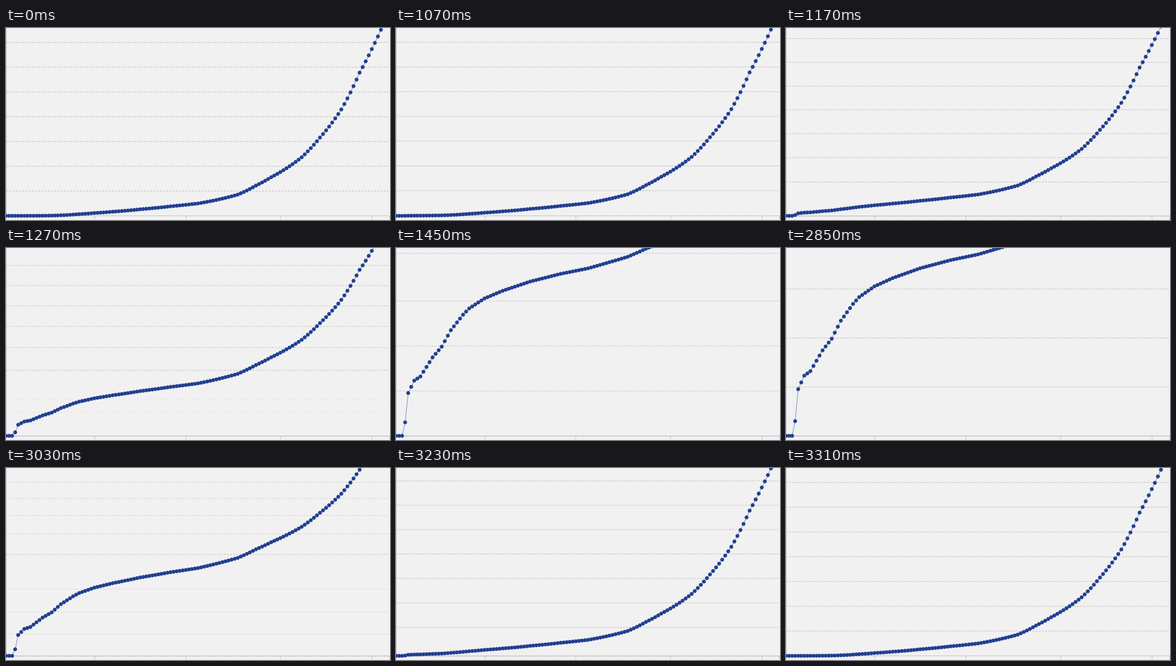
A matplotlib script that plays this animation: 600 px wide and 300 px high, repeating every 4340 ms.

```python
import numpy as np
import matplotlib.pyplot as plt
from matplotlib.animation import FuncAnimation
from matplotlib.collections import LineCollection

W, H, DPI = 600, 300, 100
PX = 72 / DPI                 # one pixel in points
LOOP, STEP = 4340, 10         # ms
BASE = 293.5                  # y of the zero line
UNIT, DECADE = 38.71, 80      # pixels per 10,000 and per power of ten
DAY = 4.763                   # pixels per day
START, BACK = 1070, 19        # first redraw in ms, redraw that turns back
RATE = .151                   # tween progress per redraw

BLUE, GRID, AXIS = "#213f91", "#bfbfbf", "#c6c6c6"

# Day and total; growth is exponential between these points
KEYS = [(2, 1), (3, 2), (4, 9), (6, 17), (8, 21), (12, 56), (15, 97),
        (18, 226), (22, 498), (24, 684), (29, 1132), (35, 1669), (44, 2638),
        (54, 3846), (63, 5000), (76, 8550), (82, 12220), (87, 15600),
        (97, 23640), (103, 31600), (110, 42930), (116, 57800), (120, 67300),
        (124, 77900)]


def ease(t):
    t = min(max(t, 0), 1)
    return 4 * t ** 3 if t < .5 else 1 - 4 * (1 - t) ** 3


def redraw_index(ms):
    """The picture is redrawn after 100, 100 and 80 ms in turn."""
    cycle, rest = divmod(ms - START, 280)
    return 3 * cycle + min(rest // 100, 2)


def log_share(ms):
    """0 on the linear scale, 1 on the log scale."""
    k = redraw_index(ms)
    return ease(.082 + RATE * k) - ease(.224 + RATE * (k - BACK))


def y_pos(values, share):
    linear = values / 1e4 * UNIT
    log = np.log10(values) * DECADE
    return BASE - (1 - share) * linear - share * log


def rows(ys):
    return [[(0, y), (W, y)] for y in ys]


def add_lines(segments, color, **style):
    lines = LineCollection(segments, colors=color, linewidths=PX, **style)
    lines.set_snap(False)
    return ax.add_collection(lines)


def add_grid(ys=()):
    return add_lines(rows(ys), GRID, linestyles=[(0, (3, 2))], zorder=1)


fig = plt.figure(figsize=(W / DPI, H / DPI), dpi=DPI, facecolor="#f1f1f1")
ax = fig.add_axes([0, 0, 1, 1])
ax.set_xlim(0, W)
ax.set_ylim(H, 0)
ax.axis("off")

key_days, key_totals = np.transpose(KEYS)
days = np.arange(key_days[-1] + 1)
totals = 10 ** np.interp(days, key_days, np.log10(key_totals))
xs = days * DAY
linear_ticks = np.arange(1, 9) * 1e4
log_ticks = 10.0 ** np.arange(1, 6)

linear_grid, log_grid = add_grid(), add_grid()
floor_line = add_grid([BASE + 1])

frame = [[(.5, 0), (.5, BASE)], *rows([BASE])]
frame += [[(x, BASE), (x, 299)] for x in (139, 281, 429, 572, 599.5)]
add_lines(frame, AXIS, zorder=2)

curve, = ax.plot([], [], color=BLUE, alpha=.5, lw=PX, zorder=3)
dots = ax.scatter(xs, totals, s=np.full(len(xs), (6 * PX) ** 2), c=BLUE,
                  linewidths=0, zorder=4)
dots.set_snap(False)


def draw(i):
    share = log_share(i * STEP)
    for grid, ticks, alpha in ((linear_grid, linear_ticks, 1 - share),
                               (log_grid, log_ticks, share)):
        grid.set_segments(rows(y_pos(ticks, share)))
        grid.set_alpha(alpha)
    floor_line.set_alpha(.6 if .01 < share < .99 else 0)
    ys = y_pos(totals, share)
    curve.set_data(xs, ys)
    dots.set_offsets(np.column_stack([xs, ys]))
    return linear_grid, log_grid, floor_line, curve, dots


anim = FuncAnimation(fig, draw, frames=LOOP // STEP, interval=STEP, repeat=True)
plt.show()
```
